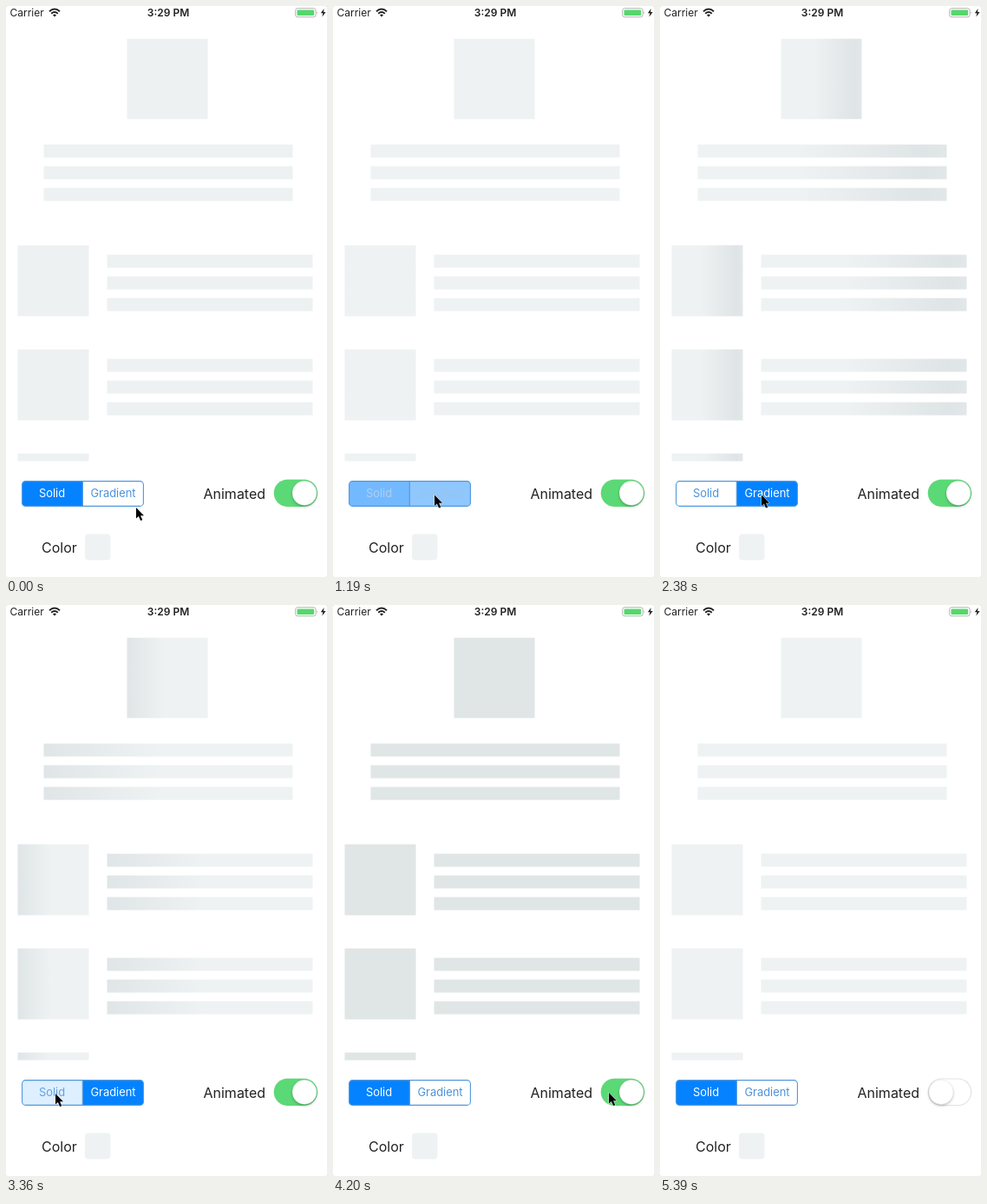
Write an HTML page that moves like this. It is 370x658 px and loops after 5460 ms.

```html
<!DOCTYPE html>
<html lang="en">
<head>
<meta charset="utf-8">
<title>Skeleton loading demo</title>
<style>
  html, body { margin: 0; width: 100%; height: 100%; overflow: hidden; background: #fff; }
  svg { display: block; width: 370px; height: 658px; }
  text { font-family: Inter, Roboto, "Liberation Sans", sans-serif; fill: #222224; }
  .status { font-size: 12px; }
  .label { font-size: 16px; }
  .seg { font-size: 12.9px; text-anchor: middle; }
</style>
</head>
<body>
<svg viewBox="0 0 370 658" xmlns="http://www.w3.org/2000/svg">
  <defs>
    <linearGradient id="shine">
      <stop offset="0" stop-color="#eef2f3"/>
      <stop offset=".5" stop-color="#dfe4e6"/>
      <stop offset="1" stop-color="#eef2f3"/>
    </linearGradient>
    <clipPath id="segClip"><rect x="18.5" y="547.5" width="140" height="29" rx="4"/></clipPath>
    <filter id="soft" x="-30%" y="-30%" width="160%" height="170%">
      <feDropShadow dx="0" dy="1.6" stdDeviation="1.4" flood-color="#000" flood-opacity=".25"/>
    </filter>
  </defs>

  <rect width="370" height="658" fill="#c4c4c4"/>
  <rect width="370" height="658" rx="1.5" fill="#fff"/>

  <!-- status bar -->
  <text class="status" x="4.5" y="12">Carrier</text>
  <g fill="none" stroke="#222224" stroke-width="1.9">
    <path d="M50 6.2Q56 .9 62 6.2"/>
    <path d="M52.2 8.7Q56 5.3 59.8 8.7"/>
  </g>
  <path d="M54 10.4Q56 8.8 58 10.4L56 12.6Z" fill="#222224"/>
  <text class="status" x="187" y="12" font-weight="600" text-anchor="middle">3:29 PM</text>
  <rect x="333.7" y="2.7" width="23.4" height="10" rx="2.4" fill="#fff" stroke="#a9aeaa" stroke-width=".9"/>
  <rect x="335.5" y="4.4" width="19.6" height="6.6" rx="1" fill="#56d76d"/>
  <path d="M358.4 6Q360 7.6 358.4 9.4Z" fill="#a9aeaa"/>
  <path d="M366.6 3L362.8 8.3H365.3L364.4 12.4L368.6 6.9H366Z" fill="#222224"/>

  <g id="bones"></g>

  <!-- segmented control -->
  <g clip-path="url(#segClip)" fill="#0482ff">
    <rect id="fill0" x="18" y="547" width="70.5" height="30"/>
    <rect id="fill1" x="88.5" y="547" width="71" height="30"/>
  </g>
  <g fill="none" stroke="#5098dc" stroke-width="1.1">
    <rect x="18.6" y="547.6" width="139.8" height="28.8" rx="4"/>
    <path d="M88.3 548V576"/>
  </g>
  <text class="seg" id="text0" x="53" y="566.4">Solid</text>
  <text class="seg" id="text1" x="123.5" y="566.4">Gradient</text>

  <!-- switch -->
  <text class="label" x="227.5" y="568.2">Animated</text>
  <rect x="309.2" y="546" width="49.6" height="30.6" rx="15.3" fill="#fff" stroke="#e4e4e4" stroke-width="1.2"/>
  <rect id="track" x="308.8" y="545.7" width="50.2" height="31.2" rx="15.6" fill="#5bd976"/>
  <circle id="thumb" cy="561.3" r="14" fill="#fff" stroke="#000" stroke-opacity=".1" stroke-width=".6" filter="url(#soft)"/>

  <text class="label" x="41" y="629.6">Color</text>
  <rect x="91" y="608.5" width="29.5" height="30" rx="4" fill="#eef2f3"/>

  <path id="cursor" d="M0 0V12.6L2.9 10L5.1 15.1L7.3 14.2L5.1 9.2H9Z" fill="#000" stroke="#fff" stroke-width=".9" paint-order="stroke"/>
</svg>

<script>
const LOOP = 5460;
const PULSE = 1000, SWEEP = 1600, FADE = 250;
const PICK_GRADIENT = 1080, PICK_SOLID = 3420, SWITCH_OFF = 4480;
const LIGHT = [238, 242, 243], DARK = [222, 228, 227];
const BLUE = [76, 147, 218], WHITE = [255, 255, 255];
const $ = id => document.getElementById(id);

// Placeholder blocks
const bones = $('bones');
function block(x, y, width, height) {
  const r = document.createElementNS('http://www.w3.org/2000/svg', 'rect');
  Object.entries({ x, y, width, height }).forEach(([k, v]) => r.setAttribute(k, v));
  bones.append(r);
}
function lines(x, y, w) {
  for (let i = 0; i < 3; i++) block(x, y + i * 25, w, 15);
}
block(139.5, 37.7, 93, 92.6);
lines(43.5, 159.6, 287);
for (const y of [275.7, 395.7]) {
  block(13.5, y, 82, 81.8);
  lines(116.5, y + 10.9, 237);
}
block(13.5, 515.7, 82, 8.8);

const ramp = (t, from, span) => Math.min(1, Math.max(0, (t - from) / span));
const smooth = u => u * u * (3 - 2 * u);
const mix = (a, b, u) => `rgb(${a.map((v, i) => Math.round(v + (b[i] - v) * u))})`;

// Blocks breathe between two tones, or a dark band sweeps across each of them
function paintBones(t) {
  if (t >= PICK_GRADIENT && t < PICK_SOLID) {
    const x = 2 * ((t - PICK_GRADIENT) / SWEEP % 1) ** 1.7 - 1;
    $('shine').setAttribute('x1', x);
    $('shine').setAttribute('x2', x + 1);
    bones.setAttribute('fill', 'url(#shine)');
    return;
  }
  const since = t < PICK_GRADIENT ? t + PULSE / 8 : t - PICK_SOLID;
  const depth = t < SWITCH_OFF ? (1 - Math.cos(Math.PI * since / PULSE)) / 2 : 0;
  bones.setAttribute('fill', mix(LIGHT, DARK, depth));
}

// A light tint while the button is held
const held = (t, click) => t < click + FADE ? .13 * ramp(t, click - 120, 40) : 0;

function paintSegment(i, chosen, tint) {
  const amount = Math.max(chosen, tint);
  $('fill' + i).setAttribute('opacity', amount);
  $('text' + i).style.fill = mix(BLUE, WHITE, amount);
}

// Pointer starts at HOME, then each leg: start time, duration, end point
const HOME = [150, 578];
const LEGS = [
  [100, 500, 117, 563.5],
  [3100, 180, 57, 563],
  [3640, 480, 318, 562],
  [4790, 450, 325, 664]
];
function pointer(t) {
  return LEGS.reduce(([x, y], [from, span, toX, toY]) => {
    const u = smooth(ramp(t, from, span));
    return [x + (toX - x) * u, y + (toY - y) * u];
  }, HOME);
}

function draw(t) {
  paintBones(t);
  const gradient = ramp(t, PICK_GRADIENT, FADE) - ramp(t, PICK_SOLID, FADE);
  paintSegment(0, 1 - gradient, held(t, PICK_SOLID));
  paintSegment(1, gradient, held(t, PICK_GRADIENT));
  const on = 1 - smooth(ramp(t, SWITCH_OFF, FADE));
  $('track').setAttribute('opacity', on);
  $('thumb').setAttribute('cx', 324 + 20 * on);
  $('cursor').setAttribute('transform', `translate(${pointer(t)})`);
}

const start = performance.now();
function tick() {
  draw((performance.now() - start) % LOOP);
  requestAnimationFrame(tick);
}
tick();
</script>
</body>
</html>
```
